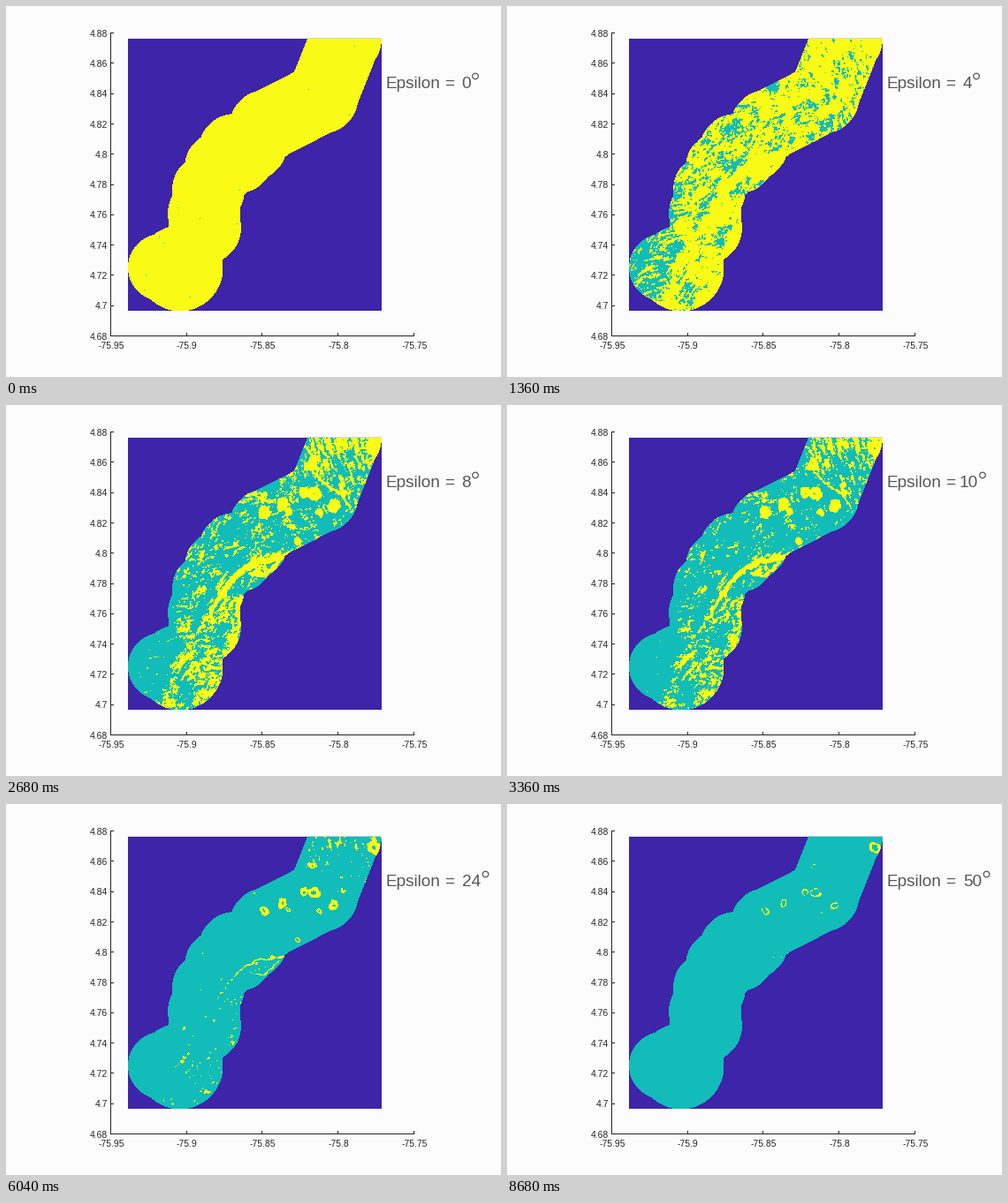
Recreate the animation shown at these times as a matplotlib script. Size 560 by 420 pixels, loop 9.32 s.

```python
import numpy as np
import matplotlib.pyplot as plt
from matplotlib.animation import FuncAnimation
from matplotlib.patches import Circle

W, H, DPI = 560, 420, 100
STEP, LOOP, HOLD = 40, 9320, 667
PAPER, INK, GREY = (252, 252, 252), (38, 38, 38), "#575757"
PURPLE, TEAL, YELLOW = (61, 36, 169), (18, 188, 184), (249, 250, 21)
LIMITS = [*range(0, 14, 2), 16, 20, 24, 30, 35, 40, 50]
TICK_Y = 30.5 + 34.3 * np.arange(11)
TICK_X = 118.5 + 85.7 * np.arange(5)

rng = np.random.default_rng(14)
y, x = np.mgrid[0:H, 0:W] + 0.5


def noise(along, across=None, angle=0):
    """Smooth unit-variance noise, stretched along a direction in degrees."""
    across = across or along
    fy, fx = np.fft.fftfreq(H)[:, None], np.fft.fftfreq(W)[None]
    c, s = np.cos(np.radians(angle)), np.sin(np.radians(angle))
    u, v = fx * c + fy * s, fy * c - fx * s
    kernel = np.exp(-2 * np.pi**2 * ((u * along) ** 2 + (v * across) ** 2))
    n = np.fft.ifft2(np.fft.fft2(rng.standard_normal((H, W))) * kernel).real
    return (n - n.mean()) / n.std()


def ramp(v):
    return 1 / (1 + np.exp(-np.clip(v, -40, 40)))


def segment_distance(px, py, a, b):
    """Distance to segment ab and the position of the nearest point on it."""
    dx, dy = b[0] - a[0], b[1] - a[1]
    t = ((px - a[0]) * dx + (py - a[1]) * dy) / (dx * dx + dy * dy)
    t = np.clip(t, 0, 1)
    return np.hypot(px - a[0] - t * dx, py - a[1] - t * dy), t


def corridor():
    """Discs along the route, joined by straight tubes in the north-east."""
    route = [(225, 251), (224, 235), (229, 208), (243, 183), (259, 163),
             (262, 171), (277, 157), (294, 136), (357.5, 103.5), (384, 37)]
    inside = (np.hypot(x - 176, y - 296) < 38) | (np.hypot(x - 197, y - 297) < 48.5)
    for cx, cy in route:
        inside |= np.hypot(x - cx, y - cy) < 41
    for a, b in zip(route[-3:], route[-2:]):
        inside |= segment_distance(x, y, a, b)[0] < 40
    return inside & (x > 138) & (x < 425) & (y > 37) & (y < 345)


def typical_slope():
    south = ramp((y - 215) / 15)
    hills = ramp((x - 185 - 0.3 * (300 - y)) / 7)
    north = ramp((x - y - 270) / 15)
    corner = ramp((x - y - 347) / 10)
    return 4.6 + south * (4.8 * hills - 2) + 2 * north + 9 * corner


def ridge(px, py, p0, p1, p2, p3, peaks, width):
    """Steep band around a cubic curve, its peak changing along the way."""
    t = np.linspace(0, 1, 17)[:, None]
    p0, p1, p2, p3 = map(np.array, (p0, p1, p2, p3))
    curve = ((1 - t) ** 3 * p0 + 3 * t * (1 - t) ** 2 * p1
             + 3 * t**2 * (1 - t) * p2 + t**3 * p3)
    height = np.linspace(*peaks, len(curve))
    out = np.zeros((H, W))
    for a, b, h0, h1 in zip(curve, curve[1:], height, height[1:]):
        d, s = segment_distance(px, py, a, b)
        out = np.maximum(out, (h0 + s * (h1 - h0)) * np.exp(-d / width))
    return out


def slope_map():
    m = typical_slope()
    patch = ramp(3 * noise(14))
    north = ramp((x - y - 240) / 20)
    flow = noise(2.8, 0.9, -12) * patch + noise(2.6, 0.9, -50) * (1 - patch)
    flow = flow * (1 - north) + noise(2.8, 1, 75) * north
    rough = 0.75 * flow + 0.55 * noise(0.65) + 0.45 * noise(5)
    slope = m * np.exp((0.35 + 0.04 * np.minimum(m, 8)) * rough)
    slope = np.minimum(slope, np.where(y < 195, 44, 29))

    px, py = x + 0.9 * noise(2.5), y + 0.9 * noise(2.5)
    jitter = np.exp(0.18 * noise(1.2))
    ridges = [
        ((217, 256), (247, 225), (242, 178), (318, 171), (16, 38), 2.9),
        ((277, 190), (288, 197), (296, 192), (308, 178), (27, 32), 2),
        ((350, 78), (360, 95), (375, 90), (390, 117), (18, 19), 2),
        ((262, 232), (268, 252), (260, 270), (247, 288), (18, 18), 2.2),
    ]
    for r in ridges:
        slope = np.maximum(slope, ridge(px, py, *r) * jitter)

    # Bigger pits have steeper walls, so they outlast the small ones.
    pits = [(291, 121, 3.6), (312.5, 112, 3.3), (338.5, 100, 3.5), (349, 101, 3.3),
            (371, 114.5, 3.3), (416, 48, 4.8), (346, 70, 2.6), (319, 120, 2),
            (355, 122, 2), (330, 154, 1.7)]
    for cx, cy, r in pits:
        d = np.abs(np.hypot(px - cx, (py - cy) * 0.9) - r)
        slope = np.maximum(slope, 21 * r * np.exp(-d / 1.6) * jitter)

    flat = rng.random((H, W)) < np.where(m < 3.2, 0.0025, 0.0002)
    return np.where(flat, 0, slope)


def base_image(inside):
    img = np.empty((H, W, 3), np.uint8)
    img[:] = PAPER
    img[37:345, 138:425] = PURPLE
    img[36, inside[37]] = (214, 210, 236)
    img[30:374, 118] = INK
    img[373, 118:462] = INK
    for ty in TICK_Y:
        img[int(ty), 118:122] = INK
    for tx in TICK_X:
        img[370:374, int(tx)] = INK
    return img


def stages():
    inside, slope = corridor(), slope_map()
    base = base_image(inside)
    base[inside] = TEAL
    for limit in LIMITS:
        img = base.copy()
        img[inside & (slope > limit)] = YELLOW
        yield img


pictures = list(stages())

fig = plt.figure(figsize=(W / DPI, H / DPI), dpi=DPI)
ax = fig.add_axes([0, 0, 1, 1])
ax.axis("off")
picture = ax.imshow(pictures[0], extent=(0, W, H, 0), interpolation="nearest",
                    aspect="auto")
ax.set(xlim=(0, W), ylim=(H, 0))


def label(tx, ty, s, px, color="#262626", **kw):
    return ax.text(tx, ty, s, fontsize=px * 72 / DPI, family="Liberation Sans",
                   color=color, **kw)


for i, ty in enumerate(TICK_Y):
    label(115, ty + 4.2, f"{4.88 - 0.02 * i:.2f}".rstrip("0"), 10.4, ha="right")
for i, tx in enumerate(TICK_X):
    label(tx + 0.5, 388.2, f"{-75.95 + 0.05 * i:.2f}".rstrip("0"), 10.4, ha="center")

label(429.5, 92.8, "Epsilon", 19, GREY)
label(496.5, 92.8, "=", 19, GREY)
number = label(526, 92.8, "0", 19, GREY, ha="right")
degree = Circle((531, 79.5), 3.3, fill=False, ec=GREY, lw=0.9)
ax.add_patch(degree)


def draw(i):
    k = i * STEP // HOLD
    limit = LIMITS[k]
    cx = 531 if limit < 10 else 538 if limit < 20 else 542.5
    picture.set_data(pictures[k])
    number.set_text(str(limit))
    number.set_x(cx - 5)
    degree.center = (cx, 79.5)
    return picture, number, degree


anim = FuncAnimation(fig, draw, frames=LOOP // STEP, interval=STEP,
                     repeat=True, repeat_delay=0)
plt.show()
```
